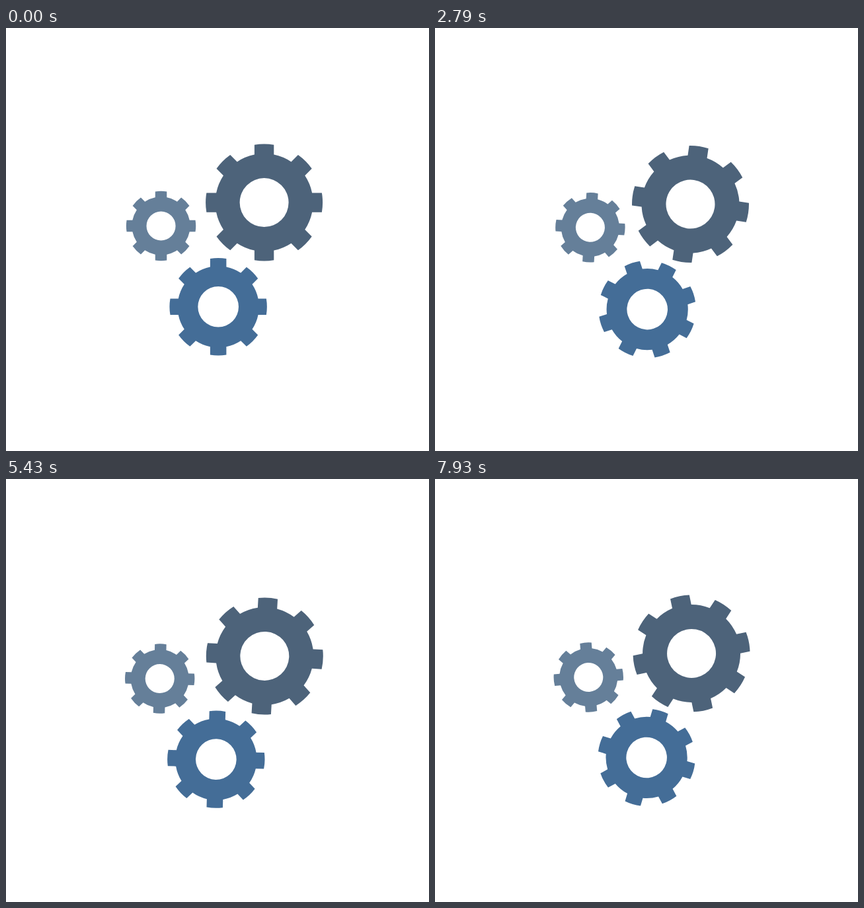
Animation of 640 by 640 pixels, one loop 8 s. Source, as an HTML page:

```html
<!DOCTYPE html>
<html lang="en">
<head>
<meta charset="utf-8">
<title>Turning gears</title>
<style>
  html, body { margin: 0; width: 100%; height: 100%; overflow: hidden; background: #fff; }
  svg { display: block; width: 100%; height: 100%; }
</style>
</head>
<body>
<svg id="stage" viewBox="0 0 640 640"></svg>
<script>
const LOOP = 8000;        // ms
const SHOWN_FPS = 14;
const MOTION_FPS = 25;

// Each gear turns about a pivot slightly off its own centre; speed is in degrees per second.
const gears = [
  { color: '#657f99', radius: 52.7, center: [234.55, 299.5], pivot: [233.65, 300.8], speed: 100 / 3 },
  { color: '#446d97', radius: 73.7, center: [321.15, 421.8], pivot: [320, 423.7], speed: 125 / 3 },
  { color: '#4d637a', radius: 88.5, center: [390.6, 264.1], pivot: [389.15, 266.35], speed: 250 / 3 }
];

function gearPath(outer) {
  const body = outer * 0.836, hole = outer * 0.418, halfTooth = outer * 0.166;
  const point = (r, a) => `${(r * Math.sin(a)).toFixed(3)} ${(-r * Math.cos(a)).toFixed(3)}`;
  const arc = (r, a) => `A${r} ${r} 0 0 1 ${point(r, a)}`;
  const base = Math.asin(halfTooth / body), tip = Math.asin(halfTooth / outer);
  let d = '';
  for (let i = 0; i < 8; i++) {
    const a = i * Math.PI / 4;
    d += (i ? arc(body, a - base) : 'M' + point(body, a - base))
      + 'L' + point(outer, a - tip) + arc(outer, a + tip)
      + 'L' + point(body, a + base);
  }
  d += arc(body, -base) + 'Z';
  return d + 'M' + point(hole, 0) + arc(hole, Math.PI) + arc(hole, 0) + 'Z';
}

for (const gear of gears) {
  gear.node = document.createElementNS('http://www.w3.org/2000/svg', 'path');
  gear.node.setAttribute('d', gearPath(gear.radius));
  gear.node.setAttribute('fill', gear.color);
  gear.node.setAttribute('fill-rule', 'evenodd');
  document.getElementById('stage').append(gear.node);
}

// Shown steps fall on 10 ms ticks and take the next pose of the 25 fps motion.
function poseTime(ms) {
  const tick = Math.floor(ms / 10) * 10;
  const step = Math.floor((tick + 5) * SHOWN_FPS / 1000);
  return Math.ceil(step * MOTION_FPS / SHOWN_FPS) / MOTION_FPS;
}

function draw() {
  const seconds = poseTime(performance.now() % LOOP);
  for (const { node, center, pivot, speed } of gears) {
    node.setAttribute('transform', `rotate(${speed * seconds} ${pivot}) translate(${center})`);
  }
  requestAnimationFrame(draw);
}
draw();
</script>
</body>
</html>
```
